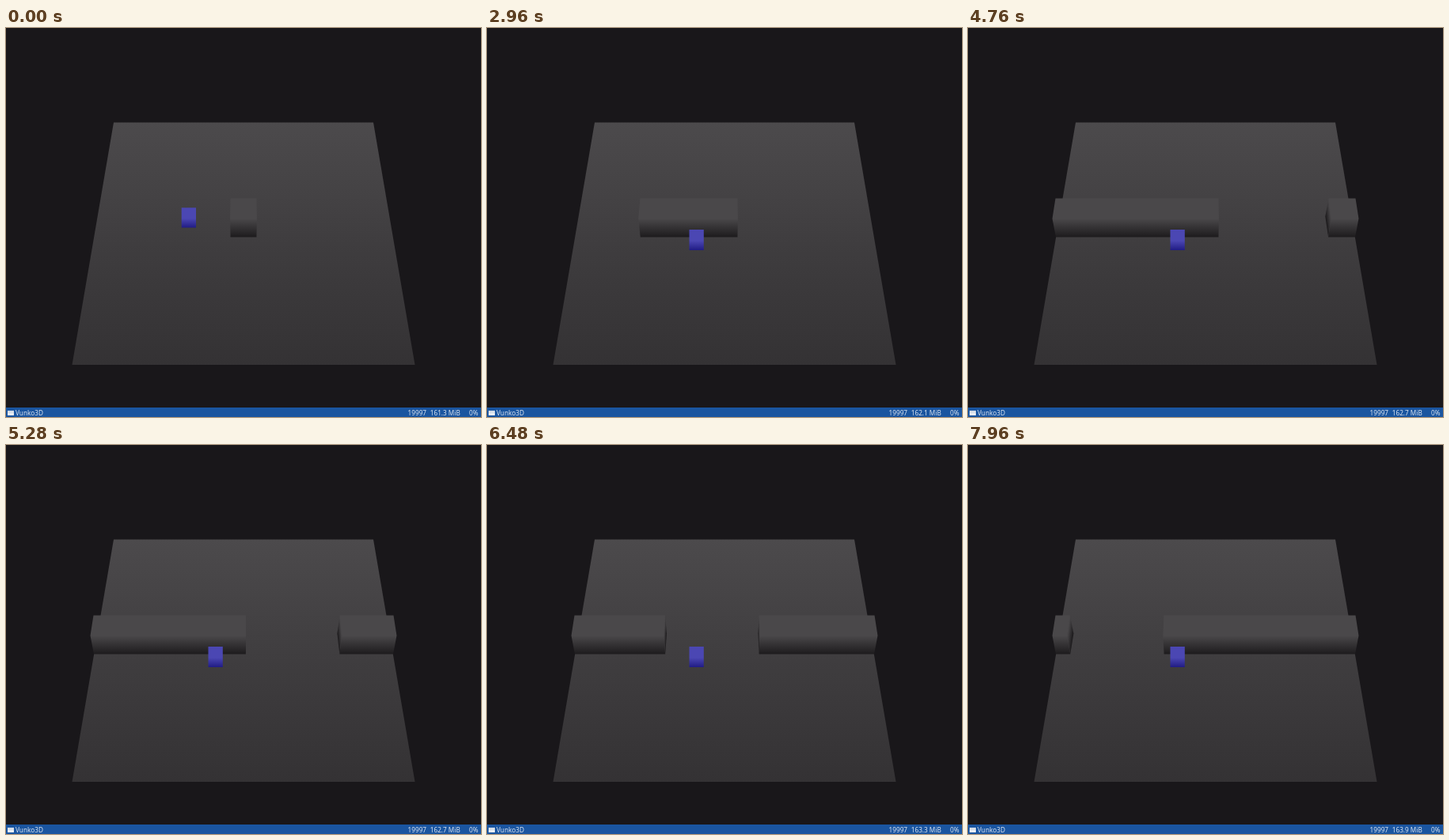
An HTML page with a canvas for the animation above (8000 ms loop, 600x492 px).

```html
<!DOCTYPE html>
<html lang="en">
<meta charset="utf-8">
<title>Vunko3D</title>
<style>
  html, body { margin: 0; width: 600px; height: 492px; overflow: hidden; background: #19171a; }
  canvas { display: block; }
</style>
<canvas width="600" height="492"></canvas>
<script>
const ctx = document.querySelector('canvas').getContext('2d');

const LOOP = 8000, STEP = 40;
const SPEED = 0.065;                 // px per ms
const HEAD_START = 1575, TAIL_START = 5072, EAT_TIME = 2240;
const WALL = 189.5, HALF = 16.5;     // measured along the upper back edge
const LIGHT = '#4a484a', DARK = '#1d1b1d';
const MEMORY = [161.3, 161.5, 161.7, 161.9, 162.1, 162.3, 162.5, 162.7, 163.3, 163.3, 163.5, 163.9];

// Perspective scale and screen height of the four long edges of the snake
const EDGES = {
  backTop: [1, 215.5],
  frontTop: [1.021, 241],
  frontBottom: [0.9975, 264.5],
  backBottom: [0.973, 238.5],
};

const project = (x, edge) => [300 + x * EDGES[edge][0], EDGES[edge][1]];

function gradient(x0, y0, x1, y1, ...colors) {
  const g = ctx.createLinearGradient(x0, y0, x1, y1);
  colors.forEach((c, i) => g.addColorStop(i / (colors.length - 1), c));
  return g;
}

function polygon(points, fill) {
  ctx.fillStyle = fill;
  ctx.beginPath();
  points.forEach(p => ctx.lineTo(...p));
  ctx.fill();
}

function rect(x, y, w, h, fill) {
  ctx.fillStyle = fill;
  ctx.fillRect(x, y, w, h);
}

function drawEnd(x) {
  const corners = Object.keys(EDGES).map(edge => project(x, edge));
  const [backTop, frontTop, frontBottom] = corners;
  const dx = frontTop[0] - backTop[0], dy = frontTop[1] - backTop[1];
  const len = Math.hypot(dx, dy), nx = dy / len, ny = -dx / len;
  const depth = (frontBottom[0] - frontTop[0]) * nx + (frontBottom[1] - frontTop[1]) * ny;
  const [fx, fy] = frontTop;
  polygon(corners, gradient(fx, fy, fx + nx * depth, fy + ny * depth, LIGHT, DARK));
}

function drawBody(left, right) {
  if (right < 0) drawEnd(right);
  if (left > 0) drawEnd(left);
  const outline = [
    project(left, 'backTop'), project(right, 'backTop'),
    project(right, 'frontTop'), project(right, 'frontBottom'),
    project(left, 'frontBottom'), project(left, 'frontTop'),
  ];
  polygon(outline, gradient(0, 241, 0, 264.5, LIGHT, DARK));
}

function drawSnake(t) {
  const head = -HALF - SPEED * Math.max(0, t - HEAD_START);
  const tail = HALF - SPEED * Math.max(0, t - TAIL_START);
  drawBody(Math.max(head, -WALL), tail);
  if (head < -WALL) drawBody(head + 2 * WALL, WALL);
}

function drawFood(t) {
  const [x, y, w, h] = t < EAT_TIME ? [221.7, 227.3, 18.3, 25.2] : [255.5, 255, 18.3, 26];
  rect(x, y, w, h, gradient(0, y + h * 0.54, 0, y + h, '#4b47b3', '#211c85'));
}

function drawStatus(t) {
  rect(0, 480, 600, 12, '#1a55a0');
  rect(2, 484, 8, 6, '#e6ebf2');
  rect(2, 485, 8, 0.6, '#a9bad0');
  ctx.font = '8.2px "Noto Sans", sans-serif';
  ctx.fillStyle = '#dbe4f0';
  ctx.textAlign = 'left';
  ctx.fillText('Vunko3D', 12, 489.5);
  ctx.textAlign = 'right';
  const memory = MEMORY[Math.floor((t + 440) / 720)];
  ctx.fillText('19997', 531, 489.5);
  ctx.fillText(memory.toFixed(1) + ' MiB', 573.7, 489.5);
  ctx.fillText('0%', 596.5, 489.5);
}

function draw(now) {
  const t = Math.floor(now % LOOP / STEP) * STEP;
  rect(0, 0, 600, 492, '#19171a');
  polygon([[136, 119.5], [464, 119.5], [516.5, 426], [83.5, 426]],
    gradient(0, 119.5, 0, 426, '#4c4a4c', '#3f3d3f', '#343234'));
  drawSnake(t);
  drawFood(t);
  drawStatus(t);
  requestAnimationFrame(draw);
}

requestAnimationFrame(draw);
</script>
</html>
```
